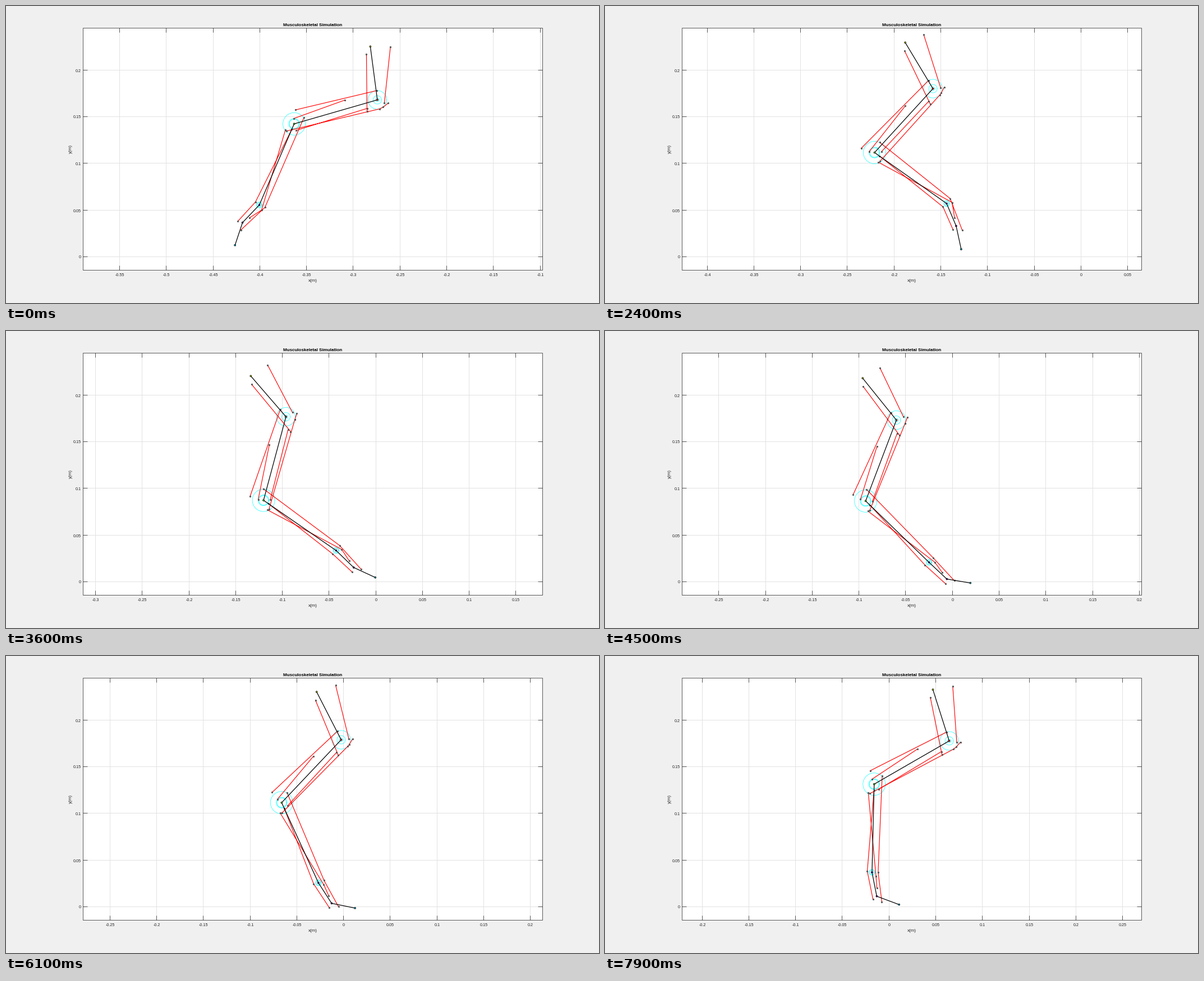
Write a matplotlib script that moves like this. It is 1057 px wide and 530 px high and loops after 8000 ms.

```python
import numpy as np
import matplotlib.pyplot as plt
from matplotlib.animation import FuncAnimation
from matplotlib.collections import LineCollection

W, H, DPI = 1057, 530, 64
PT = 72 / DPI                                          # points per pixel
LEFT, RIGHT, TOP, BOTTOM = 137.5, 956.5, 39.5, 471.5   # plot box
MID_X, ZERO_Y, SCALE = 547.2, 447.8, 1665.5            # pixels per metre
TICK, HOLD, FRAMES = 8, 4, 80
INK, GRID, RED, CYAN = "#262626", "#e2e2e2", "#ff0000", "#00ffff"

# Gait keys: step, shoulder x and y, then the five bone angles from vertical.
# The first and last rows lie outside the loop and only shape the slopes.
KEYS = np.array([
    [-11, -550.0, 158.0, 13.0, -68.0, -12.0, -8.0, 45.0],
    [0, -456.7, 168.0, 7.5, -73.9, -23.2, -43.6, -18.4],
    [10, -361.6, 156.5, 17.7, -74.3, 19.7, -31.9, -44.5],
    [20, -263.8, 148.0, 31.0, -42.4, 54.7, 23.0, 12.2],
    [32, -160.1, 153.5, 40.8, -15.0, 55.3, 45.9, 65.2],
    [41, -99.8, 159.5, 38.8, -20.8, 45.9, 46.8, 80.5],
    [57, -4.2, 150.0, 27.1, -43.4, 24.6, 32.8, 78.5],
    [75, 107.3, 152.0, 17.6, -60.0, -1.4, 11.2, 69.5],
    [84, 170.0, 158.0, 13.0, -68.0, -12.0, -8.0, 45.0],
])
STEPS, POSES = KEYS[:, 0], KEYS[:, 1:]
SLOPES = np.gradient(POSES, STEPS, axis=0)
BONES = [96.0, 154.4, 157.4, 43.5, 42.5]
WRAP = 16.6
GAP = np.full((1, 2), np.nan)
TURN = np.linspace(0, 2 * np.pi, 61)
UNIT = np.column_stack([np.cos(TURN), np.sin(TURN)])


def pose(step):
    """Cubic Hermite interpolation of the gait keys."""
    k = min(max(np.searchsorted(STEPS, step, "right") - 1, 1), len(STEPS) - 3)
    h = STEPS[k + 1] - STEPS[k]
    t = (step - STEPS[k]) / h
    a, b = POSES[k], POSES[k + 1]
    return ((1 + 2 * t) * (1 - t) ** 2 * a + t * t * (3 - 2 * t) * b
            + h * t * (1 - t) * ((1 - t) * SLOPES[k] - t * SLOPES[k + 1]))


def place(base, angle, along, side=0):
    """Point given along and beside a bone that leaves base at angle."""
    s, c = np.sin(np.radians(angle)), np.cos(np.radians(angle))
    return base + along * np.array([s, c]) + side * np.array([c, -s])


def tangent(center, point, sign):
    """Angle on the wrapping circle where the line to point touches it."""
    d = point - center
    return np.arctan2(d[1], d[0]) + sign * np.arccos(WRAP / np.hypot(*d))


def wrapped(center, start, end):
    first = tangent(center, start, 1)
    last = max(first, tangent(center, end, -1))
    on_circle = [center + WRAP * np.array([np.cos(a), np.sin(a)])
                 for a in (first, last)]
    return [start, *on_circle, end]


def joined(parts):
    return np.vstack([row for p in parts for row in (np.array(p), GAP)])


def skeleton(step):
    x, y, *ang = pose(step)
    scap, hum, fore, hand, toes = ang
    shoulder = np.array([x, y])
    top = place(shoulder, scap, -BONES[0])
    elbow = place(shoulder, hum, BONES[1])
    wrist = place(elbow, fore, BONES[2])
    knuckle = place(wrist, hand, BONES[3])
    tip = place(knuckle, toes, BONES[4])
    joints = np.array([top, shoulder, elbow, wrist, knuckle, tip])

    muscles = [
        [place(top, scap, 12.2, -8.6), place(shoulder, hum, 23.5, 15)],
        [place(top, scap, 5, 35.5), place(shoulder, hum, -10.3, 9.2)],
        wrapped(shoulder, place(shoulder, scap, 8.2, 18.5),
                place(elbow, fore, 16.9, -7.1)),
        [place(shoulder, scap, -16.5, 0.8), place(elbow, fore, -23.8, -7.7)],
        [place(shoulder, hum, 56, -15.7), place(elbow, fore, -8.7, -4.2)],
        [place(shoulder, hum, 21.7, 9.6), place(elbow, fore, 9.1, 8.1)],
        [place(elbow, hum, -19.7, -5.6), place(wrist, fore, 0, 10.9),
         place(wrist, hand, 55, 7)],
        [place(elbow, fore, 15.5, -10.1), place(wrist, fore, 7, 7.3),
         place(wrist, hand, 29.2, 3)],
        [place(elbow, fore, 11), place(wrist, fore, -1.9, -8.5),
         place(wrist, hand, 47.2, -7.7)],
    ]
    rings = [c + r * UNIT for c, radii in (
        (shoulder, (16.6, 7.5, 3)), (elbow, (20, 9.6, 8.4)),
        (wrist, (5.2, 3.8))) for r in radii]
    return joints, joined(muscles), joined(rings)


def number(v):
    return f"{round(v, 2):g}"


def crisp(v):
    """Move a coordinate onto the pixel that holds it."""
    return np.floor(v - 0.5) + 0.5


fig = plt.figure(figsize=(W / DPI, H / DPI), dpi=DPI, facecolor="#f0f0f0")
ax = fig.add_axes([0, 0, 1, 1])
ax.set_xlim(0.5, W + 0.5)
ax.set_ylim(H + 0.5, 0.5)
ax.axis("off")


def label(x, y, text, px, color=INK, **kw):
    kw = {"ha": "center", "va": "baseline", **kw}
    return ax.text(x, y, text, fontsize=px * PT, family="Liberation Sans",
                   color=color, **kw)


def segments(color, width, z):
    lines = LineCollection([], colors=color, linewidths=width * PT,
                           snap=True, zorder=z)
    return ax.add_collection(lines, autolim=False)


ax.add_patch(plt.Rectangle((LEFT, TOP), RIGHT - LEFT, BOTTOM - TOP,
                           facecolor="white", edgecolor="none", zorder=0))
ax.add_patch(plt.Rectangle((LEFT, TOP), RIGHT - LEFT, BOTTOM - TOP, snap=True,
                           fill=False, edgecolor=INK, lw=0.75 * PT, zorder=3))
label(547.5, 36, "Musculoskeletal Simulation", 8.05, "black", weight="bold")
label(547.5, 493, "x(m)", 8)
label(117, 255.5, "y(m)", 8, rotation=90, rotation_mode="anchor")

y_grid, y_ticks = [], []
for v in np.arange(5) * 0.05:
    y = crisp(ZERO_Y - v * SCALE)
    y_grid.append([(LEFT, y), (RIGHT, y)])
    y_ticks += [[(LEFT, y), (LEFT + TICK, y)], [(RIGHT - TICK, y), (RIGHT, y)]]
    label(134.5, y + 3.5, number(v), 7.3, ha="right")
segments(GRID, 1, 1).set_segments(y_grid)
segments(INK, 0.75, 3).set_segments(y_ticks)

x_grid = segments(GRID, 1, 1)
x_ticks = segments(INK, 0.75, 3)
x_labels = [label(0, 482.5, "", 7.3) for _ in range(11)]

ring_line, = ax.plot([], [], color=CYAN, lw=0.65 * PT, zorder=4)
muscle_line, = ax.plot([], [], color=RED, lw=1.15 * PT, marker="o",
                       ms=2.3 * PT, mfc="#999999", mec="#202020",
                       mew=0.7 * PT, zorder=5)
bone_line, = ax.plot([], [], color="black", lw=1.25 * PT, zorder=6)
joint_dots = ax.scatter(
    np.zeros(6), np.zeros(6), s=(2.9 * PT) ** 2, zorder=7,
    c=["#a0a000", "#e00000", "#00d000", "#0000b0", "#600070", "#0090a0"],
    edgecolors="black", linewidths=0.7 * PT)


def draw(frame):
    joints, muscles, rings = skeleton(max(0, frame - HOLD))
    xs = np.concatenate([joints[:, 0], muscles[:, 0], rings[:, 0]])
    shift = MID_X - (np.nanmin(xs) + np.nanmax(xs)) / 2
    for points in (joints, muscles, rings):
        points[:, 0] += shift
    ring_line.set_data(*rings.T)
    muscle_line.set_data(*muscles.T)
    bone_line.set_data(*joints.T)
    joint_dots.set_offsets(joints)

    pitch = 0.05 * SCALE
    ticks = np.arange(np.ceil((LEFT - shift) / pitch),
                      np.floor((RIGHT - shift) / pitch) + 1)
    px = crisp(ticks * pitch + shift)
    x_grid.set_segments([[(x, TOP), (x, BOTTOM)] for x in px])
    x_ticks.set_segments(
        [[(x, BOTTOM - TICK), (x, BOTTOM)] for x in px]
        + [[(x, TOP), (x, TOP + TICK)] for x in px])
    for i, text in enumerate(x_labels):
        shown = i < len(px)
        text.set_visible(shown)
        if shown:
            text.set_x(px[i] + 0.5)
            text.set_text(number(ticks[i] * 0.05 + 0.0))
    return ring_line, muscle_line, bone_line, joint_dots


anim = FuncAnimation(fig, draw, frames=FRAMES, interval=100, repeat=True,
                     repeat_delay=0, blit=False)
plt.show()
```
